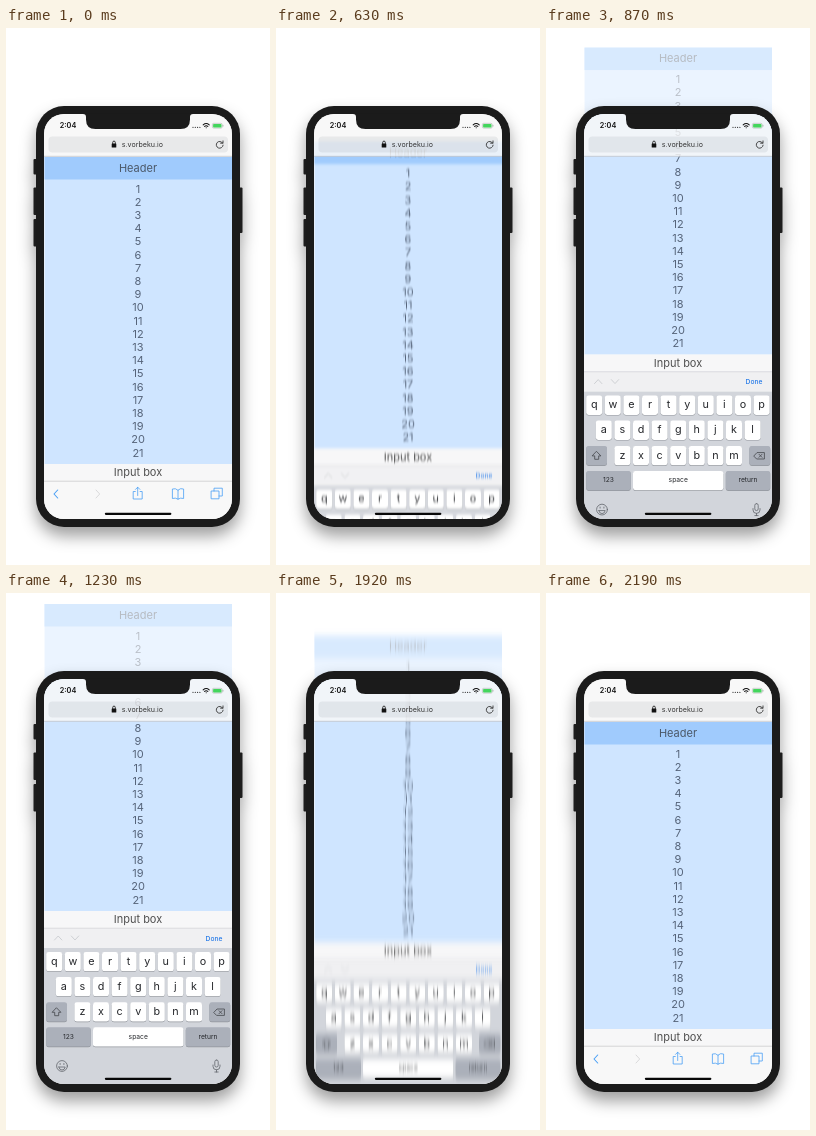
Recreate the animation shown at these times as an HTML page. Size 264 by 537 pixels, loop 2.4 s.

```html
<!DOCTYPE html>
<html lang="en">
<head>
<meta charset="utf-8">
<title>Header, list and keyboard</title>
<style>
html, body { margin: 0; width: 100%; height: 100%; overflow: hidden; background: #fff; }
svg { display: block; width: 100%; height: 100%; }
text { font-family: Inter, Roboto, sans-serif; text-anchor: middle; }
.line { fill: none; stroke-linecap: round; stroke-linejoin: round; }
</style>
</head>
<body>
<svg viewBox="0 0 264 537">
  <defs>
    <filter id="blur" filterUnits="userSpaceOnUse" x="30" y="100" width="204" height="520" color-interpolation-filters="sRGB">
      <feGaussianBlur id="gauss" stdDeviation="0 0"/>
    </filter>
    <filter id="shadow" filterUnits="userSpaceOnUse" x="-20" y="40" width="304" height="520" color-interpolation-filters="sRGB">
      <feDropShadow dx="0" dy="9" stdDeviation="8" flood-color="#000" flood-opacity=".38"/>
    </filter>
    <clipPath id="screen"><rect x="38" y="86" width="188" height="405" rx="20"/></clipPath>
    <clipPath id="above"><rect width="264" height="90"/></clipPath>
    <g id="page">
      <g id="pageBody">
        <rect x="38.5" y="129" width="187.5" height="307" fill="#cfe5ff"/>
        <rect x="38.5" y="129" width="187.5" height="22.5" fill="#a0cbfd"/>
        <rect x="38" y="436" width="188" height="18" fill="#f7f7f8"/>
        <text x="132" y="143.8" font-size="11" fill="#4b5868">Header</text>
        <g id="list" font-size="11" fill="#56647a"></g>
        <text x="132" y="448.2" font-size="11" fill="#505050">Input box</text>
      </g>
    </g>
  </defs>

  <g clip-path="url(#above)"><use id="ghost" href="#page" opacity=".4"/></g>

  <g filter="url(#shadow)">
    <g fill="#1d1d1d">
      <rect x="27.5" y="131" width="5" height="15.5" rx="1"/>
      <rect x="27.5" y="159.5" width="5" height="27.5" rx="1"/>
      <rect x="27.5" y="191" width="5" height="27.5" rx="1"/>
      <rect x="231" y="159.5" width="5.5" height="45.5" rx="1"/>
    </g>
    <rect x="30" y="78" width="204" height="421" rx="28" fill="#1b1b1b"/>
  </g>

  <g clip-path="url(#screen)">
    <rect x="38" y="86" width="188" height="405" fill="#f8f8f8"/>
    <use id="content" href="#page"/>

    <g id="bottomBar">
      <rect x="38" y="453" width="188" height="38" fill="#f8f8f8"/>
      <path d="M38 453.2H226" stroke="#bcbcbe" stroke-width=".6"/>
      <g class="line" stroke="#4ba0f5" stroke-width=".8">
        <path d="M51.7 462l-3.7 4 3.7 4" stroke-width="1.1"/>
        <path d="M90 462l3.7 4-3.7 4" stroke="#d2d2d4"/>
        <path d="M129.3 463.5H127.2V471H136.2V463.5H134.1M131.7 467.5V459.3M129.5 461.4L131.7 459.2 133.9 461.4"/>
        <path d="M172 462.2Q169.5 459.8 166.4 461V470.5Q169.5 469.4 172 471.2 174.5 469.4 177.6 470.5V461Q174.5 459.8 172 462.2V471.2"/>
        <path d="M205.5 463H213V470.8H205.5ZM208 463V460.2H216.3V468H213"/>
      </g>
    </g>

    <g id="keyboard">
      <rect x="38" y="335" width="188" height="20" fill="#f0f0f2"/>
      <path d="M38 335.2H226" stroke="#cbccd0" stroke-width=".6"/>
      <path class="line" d="M48.5 347l3.7-4 3.7 4M65.3 343l3.7 4 3.7-4" stroke="#c6c8cc" stroke-width=".8"/>
      <text x="208" y="347.6" font-size="6.7" font-weight="500" fill="#2379e8">Done</text>
      <rect x="38" y="355" width="188" height="260" fill="#d2d5db"/>
      <g id="keys"></g>
      <g class="line" stroke="#44474c" stroke-width=".8">
        <path d="M50.7 415l4.2 4.3h-2.2v3.4h-4v-3.4h-2.2Z"/>
        <path d="M208 419.2l3-3.2h7.4v6.4H211ZM213 417.7l3 3M216 417.7l-3 3"/>
        <g stroke="#62666d">
          <circle cx="56" cy="473" r="5.4"/>
          <path d="M52.8 474h6.4q-.5 3-3.2 3t-3.2-3M54.1 470.5v1M57.9 470.5v1"/>
          <rect x="208.8" y="467" width="3.4" height="7" rx="1.7"/>
          <path d="M207 472v1.3a3.5 3.5 0 0 0 7 0V472M210.5 476.8V479M208.8 479h3.4"/>
        </g>
      </g>
    </g>

    <rect x="38" y="86" width="188" height="42.5" fill="#f8f8f8" opacity=".84"/>
    <path d="M38 128.3H226" stroke="#aeb3ba" stroke-width=".6"/>
    <rect x="42.5" y="108.5" width="179.5" height="16" rx="4" fill="#1b2734" opacity=".075"/>
    <text x="62" y="100.3" font-size="7.3" font-weight="600" fill="#111">2:04</text>
    <g fill="#222">
      <circle cx="187" cy="99.3" r=".6"/><circle cx="189.3" cy="99.3" r=".6"/>
      <circle cx="191.6" cy="99.3" r=".6"/><circle cx="193.9" cy="99.3" r=".6"/>
    </g>
    <path class="line" d="M197.2 96.8q3-2.6 6 0M198.6 98.4q1.6-1.3 3.2 0M200.2 99.8h.01" stroke="#111" stroke-width="1.1"/>
    <rect x="206.4" y="95.3" width="9.8" height="4.8" rx="1.3" fill="none" stroke="#9aa39c" stroke-width=".5"/>
    <rect x="207.1" y="96" width="8.4" height="3.4" rx=".7" fill="#43d65c"/>
    <path d="M217 96.9v1.6" stroke="#9aa39c" stroke-width=".7"/>
    <rect x="105.7" y="115.6" width="4.6" height="3.8" rx=".5" fill="#111"/>
    <path class="line" d="M106.7 115.6v-1.2a1.3 1.3 0 0 1 2.6 0v1.2" stroke="#111" stroke-width=".8"/>
    <text x="136.4" y="119.1" font-size="7.1" fill="#333">s.vorbeku.io</text>
    <path class="line" d="M216.6 115a3.4 3.4 0 1 0 .5 2.2M217 112.9v2.3h-2.4" stroke="#222" stroke-width=".8"/>
    <rect x="98.8" y="484.7" width="66.6" height="2.2" rx="1.1" fill="#080808"/>
  </g>
  <path d="M77 85.5V86q3 .2 3 3v2.500q0 9.500 9.500 9.500H174.500q9.500 0 9.500-9.500V89q0-2.800 3-3v-.5Z" fill="#1b1b1b"/>
</svg>
<script>
const LOOP = 2400, TRAVEL = 118;
const $ = id => document.getElementById(id);

function addText(parent, x, y, label, attrs = {}) {
  return add(parent, 'text', { x, y, ...attrs }, label);
}

function add(parent, tag, attrs, label) {
  const el = document.createElementNS('http://www.w3.org/2000/svg', tag);
  for (const name in attrs) el.setAttribute(name, attrs[name]);
  if (label) el.textContent = label;
  return parent.appendChild(el);
}

function addKey(x, y, w, fill, label, size = 10.8) {
  const box = { x, width: w, height: 19.3, rx: 2.4 };
  add($('keys'), 'rect', { ...box, y: y + 0.7, fill: '#92969d' });
  add($('keys'), 'rect', { ...box, y, fill });
  if (label) {
    addText($('keys'), x + w / 2, y + 9.2 + size * 0.33, label, { 'font-size': size, fill: '#25272b' });
  }
}

for (let i = 0; i < 21; i++) addText($('list'), 132, 164.6 + i * 13.2, i + 1);

const GRAY = '#abb0ba';
[['qwertyuiop', 48.2, 359], ['asdfghjkl', 57.8, 384], ['zxcvbnm', 76.4, 409.3]].forEach(([row, x, y]) => {
  [...row].forEach((ch, i) => addKey(x + i * 18.6 - 8, y, 16, '#fff', ch));
});
addKey(40.2, 409.3, 20.8, GRAY);
addKey(203.4, 409.3, 20.8, GRAY);
addKey(40.2, 434.3, 44.6, GRAY, '123', 6.7);
addKey(87, 434.3, 90.4, '#fff', 'space', 6.7);
addKey(179.8, 434.3, 44.4, GRAY, 'return', 6.7);

// Cubic bezier easing with control points (x1, 0) and (x2, 1).
function ease(p, x1, x2) {
  if (p <= 0) return 0;
  if (p >= 1) return 1;
  let lo = 0, hi = 1, s;
  for (let i = 0; i < 24; i++) {
    s = (lo + hi) / 2;
    const x = 3 * (1 - s) * s * ((1 - s) * x1 + s * x2) + s ** 3;
    if (x < p) lo = s; else hi = s;
  }
  return s * s * (3 - 2 * s);
}

function quartInOut(p) {
  p = Math.min(1, Math.max(0, p));
  return p < 0.5 ? 8 * p ** 4 : 1 - 8 * (1 - p) ** 4;
}

const lift = t => ease((t - 500) / 520, 0.51, 0.28) - quartInOut((t - 1720) / 470);

function render(t) {
  const k = lift(t);
  const smear = Math.abs(lift(t + 14) - k) * TRAVEL / 3;
  const up = `translate(0 ${-k * TRAVEL})`;
  $('content').setAttribute('transform', up);
  $('ghost').setAttribute('transform', up);
  $('keyboard').setAttribute('transform', `translate(0 ${(1 - k) * TRAVEL})`);
  $('keyboard').setAttribute('opacity', Math.min(1, Math.max(0, k * 7)));
  $('bottomBar').setAttribute('opacity', Math.max(0, 1 - k * 9));
  $('gauss').setAttribute('stdDeviation', `0 ${smear}`);
  for (const id of ['pageBody', 'keyboard']) {
    if (smear > 0.08) $(id).setAttribute('filter', 'url(#blur)');
    else $(id).removeAttribute('filter');
  }
}

const start = performance.now();
function tick() {
  render((performance.now() - start) % LOOP);
  requestAnimationFrame(tick);
}
tick();
</script>
</body>
</html>
```
